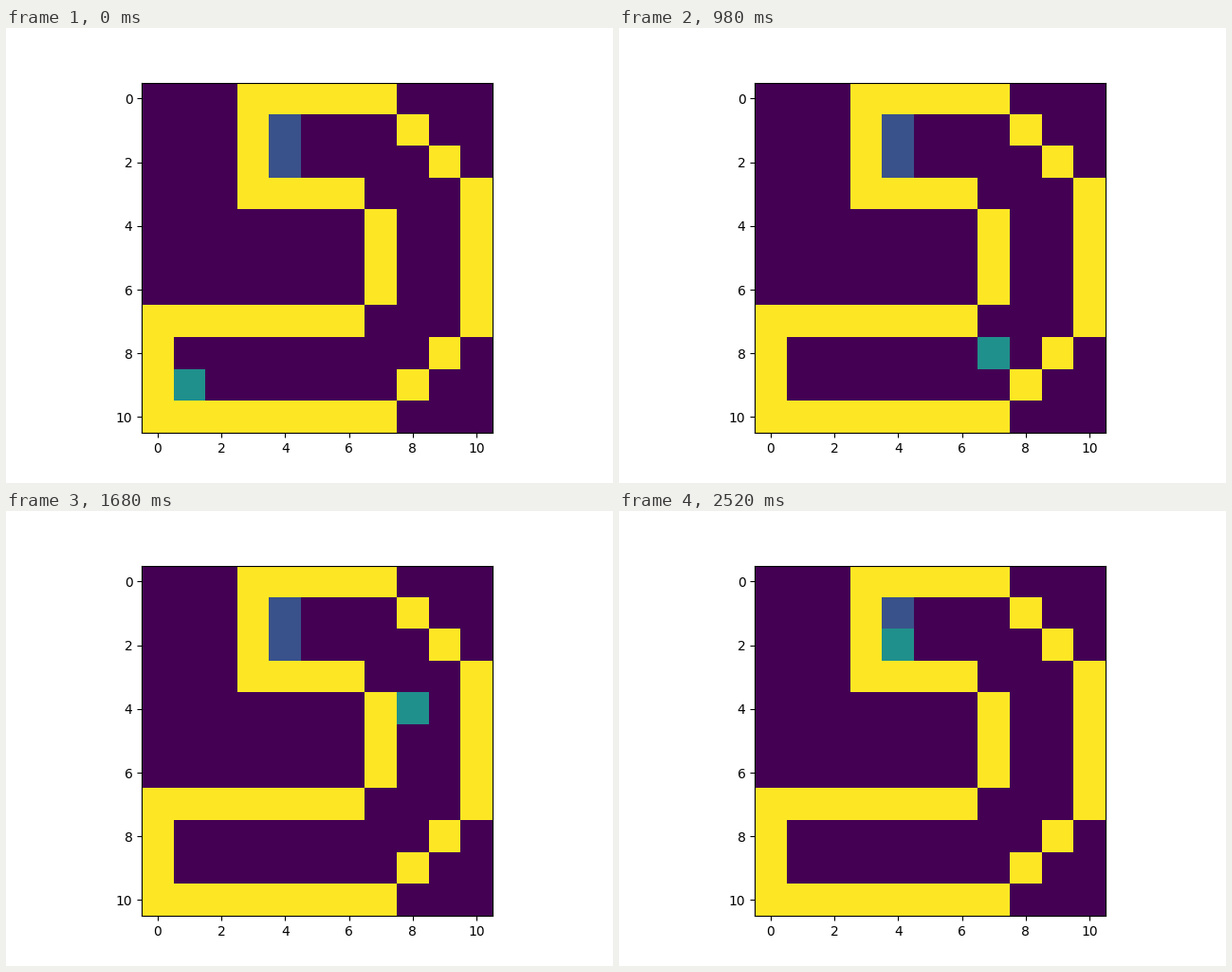
Recreate the animation shown at these times as a matplotlib script. Size 640 px wide and 480 px high, loop 2.66 s.

```python
import matplotlib.pyplot as plt
import numpy as np
from matplotlib.animation import FuncAnimation

FLOOR, GOAL, CAR, WALL = 0, 1, 2, 4
STEP_MS = 140

TRACK = [
    "...#####...",
    "...#o...#..",
    "...#o....#.",
    "...####...#",
    ".......#..#",
    ".......#..#",
    ".......#..#",
    "#######...#",
    "#........#.",
    "#.......#..",
    "########...",
]
CODES = {".": FLOOR, "o": GOAL, "#": WALL}
grid = np.array([[CODES[c] for c in row] for row in TRACK])

# Corners of the route as (row, column); the car moves one cell per step.
CORNERS = [(9, 1), (9, 4), (8, 4), (8, 8), (2, 8), (2, 4)]


def walk(corners):
    path = [corners[0]]
    for target in corners[1:]:
        while path[-1] != target:
            r, c = path[-1]
            path.append((r + int(np.sign(target[0] - r)),
                         c + int(np.sign(target[1] - c))))
    return path


path = walk(CORNERS)

fig, ax = plt.subplots(figsize=(6.4, 4.8), dpi=100)
image = ax.imshow(grid, cmap="viridis", vmin=FLOOR, vmax=WALL)


def draw(step):
    scene = grid.copy()
    scene[path[step]] = CAR
    image.set_data(scene)
    return [image]


anim = FuncAnimation(fig, draw, frames=len(path), interval=STEP_MS,
                     repeat=True, repeat_delay=0)
plt.show()
```
